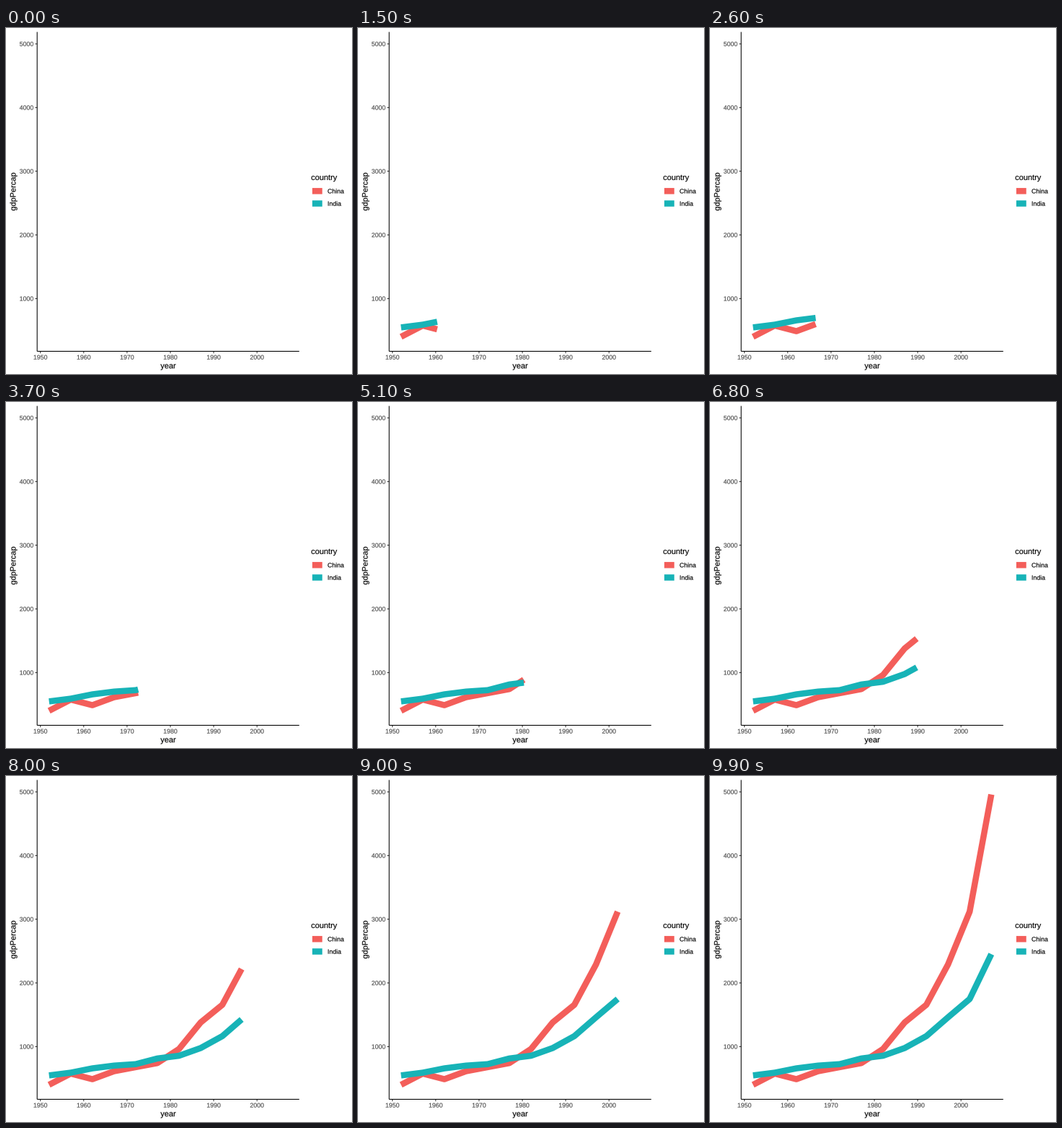
A matplotlib script that plays this animation: 480 by 480 pixels, repeating every 10 s.

```python
import numpy as np
import matplotlib.pyplot as plt
from matplotlib.animation import FuncAnimation
from matplotlib.patches import PathPatch
from matplotlib.textpath import TextPath
from matplotlib.transforms import Affine2D

plt.rcParams["font.family"] = "Liberation Sans"

SIZE, DPI = 480, 100
PX = 72 / DPI  # points per pixel
FRAMES = 100
LEFT, RIGHT, TOP, BOTTOM = 43.2, 406.8, 5.5, 448.5
MID_X, MID_Y = (LEFT + RIGHT) / 2, (TOP + BOTTOM) / 2
TICK, GAP = 2.75, 2.2
SMALL, LARGE, CAP = 8.8, 11, 0.716  # font sizes, cap height in em
KEY, LINE, THIN = 17.28, 8.54, 1.07
GREY = "#4D4D4D"

# One value every five years
YEARS = np.arange(1952, 2008, 5)
SERIES = {
    "China": ("#F35E5A", [400, 576, 488, 613, 677, 741,
                          962, 1379, 1656, 2289, 3119, 4959]),
    "India": ("#17B3B7", [547, 590, 658, 701, 724, 813,
                          856, 977, 1164, 1459, 1747, 2452]),
}


def scale(lo, hi, start, end):
    """Map data to pixels with 5% padding at both ends."""
    pad = 0.05 * (hi - lo)
    return lambda v: np.interp(v, [lo - pad, hi + pad], [start, end])


to_x = scale(1952, 2007, LEFT, RIGHT)
to_y = scale(400, 4959, BOTTOM, TOP)

fig = plt.figure(figsize=(SIZE / DPI, SIZE / DPI), dpi=DPI, facecolor="white")
ax = fig.add_axes([0, 0, 1, 1])
ax.set(xlim=(0, SIZE), ylim=(SIZE, 0))
ax.axis("off")


def stroke(xs, ys, color, width, z=2):
    return ax.plot(xs, ys, color=color, lw=width * PX, solid_capstyle="butt",
                   solid_joinstyle="round", snap=False, zorder=z)[0]


def advance(text, size):
    def end(s):
        return TextPath((0, 0), s, size=size).get_extents().x1
    return end(text + "|") - end("|")


def label(x, y, text, size=SMALL, color="black", align=0, angle=0):
    """Draw text as outlines for sub-pixel placement; align runs 0 to 1."""
    path = TextPath((-align * advance(text, size), 0), text, size=size)
    place = Affine2D().scale(1, -1).rotate_deg(-angle).translate(x, y)
    ax.add_patch(PathPatch(place.transform_path(path), facecolor=color,
                           edgecolor=color, lw=0.15 * PX, snap=False))


# Axes
half_cap = SMALL * CAP / 2
for year in range(1950, 2001, 10):
    x = to_x(year)
    stroke([x, x], [BOTTOM, BOTTOM + TICK], "#333333", THIN)
    label(x, BOTTOM + TICK + GAP + 2 * half_cap, str(year), color=GREY, align=0.5)
for value in range(1000, 5001, 1000):
    y = to_y(value)
    stroke([LEFT - TICK, LEFT], [y, y], "#333333", THIN)
    label(LEFT - TICK - GAP, y + half_cap, str(value), color=GREY, align=1)
stroke([LEFT, LEFT], [TOP, BOTTOM], "black", THIN, z=4)
stroke([LEFT, RIGHT], [BOTTOM, BOTTOM], "black", THIN, z=4)
label(MID_X, 472.2, "year", LARGE, align=0.5)
label(13.4, MID_Y, "gdpPercap", LARGE, align=0.5, angle=90)

# Legend, with one growing line per series
legend_x = 423.2
label(legend_x, 210.9, "country", LARGE)
lines = {}
for i, (name, (color, _)) in enumerate(SERIES.items()):
    y = 226.2 + KEY * i
    stroke([legend_x + 0.1 * KEY, legend_x + 0.9 * KEY], [y, y], color, LINE)
    label(legend_x + KEY + 5.5, y + half_cap, name)
    lines[name] = stroke([], [], color, LINE, z=3)


def update(frame):
    now = 1952 + 55 * frame / (FRAMES - 1)
    xs = np.append(YEARS[YEARS < now], now)
    for name, (_, values) in SERIES.items():
        lines[name].set_data(to_x(xs), to_y(np.interp(xs, YEARS, values)))
    return list(lines.values())


anim = FuncAnimation(fig, update, frames=FRAMES, interval=100,
                     repeat=True, repeat_delay=0, blit=False)
plt.show()
```
